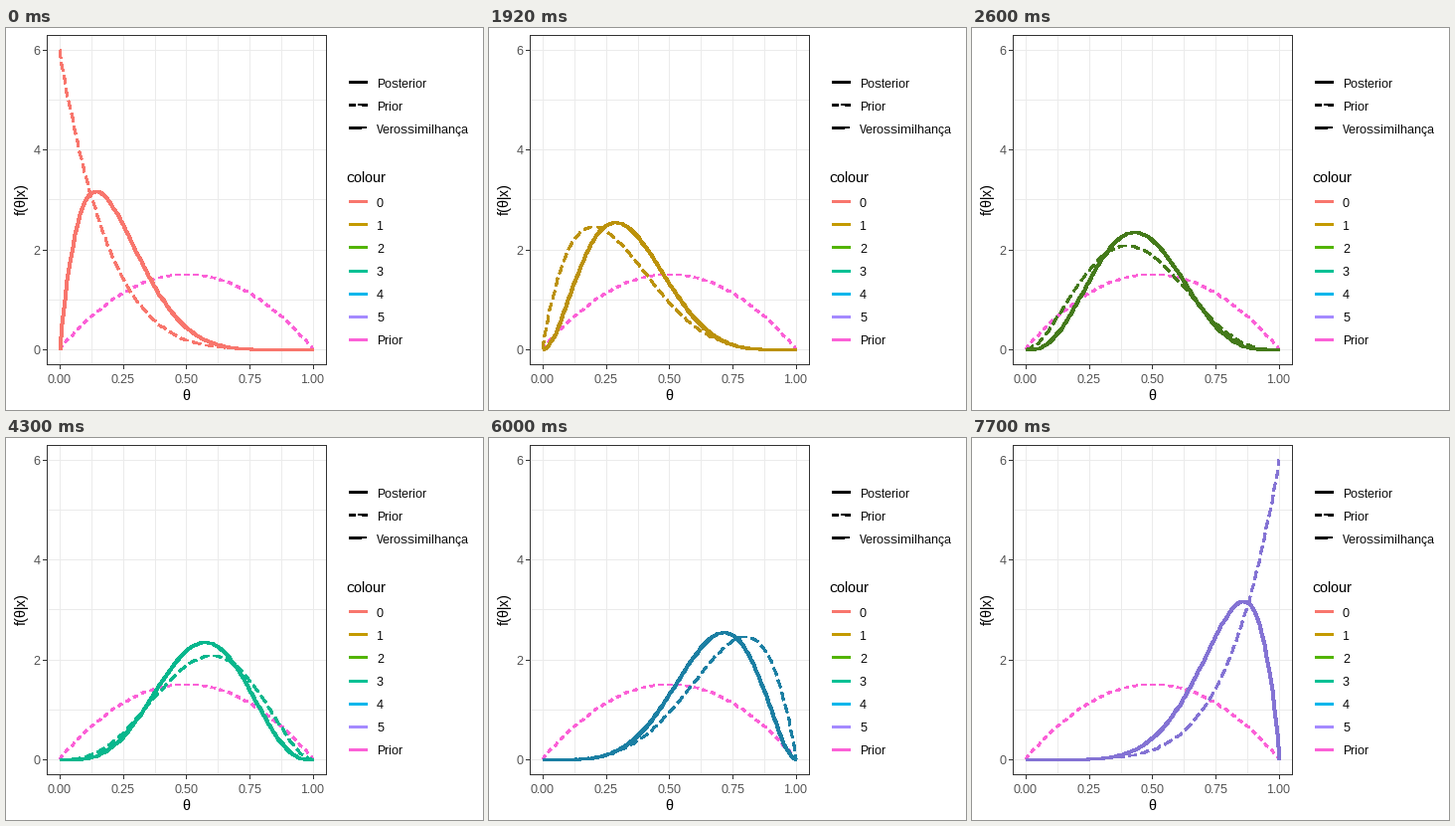
Recreate the animation shown at these times as a matplotlib script. Size 480 by 384 pixels, loop 9300 ms.

```python
from math import gamma

import matplotlib.pyplot as plt
import numpy as np
from matplotlib.animation import FuncAnimation

W, H, DPI = 480, 384, 96
PX = 72 / DPI  # points per pixel
TICK_MS = 100
LOOP_MS = 9300
CHANGES = [900, 2600, 4300, 6000, 7700]
TRIALS = 5

plt.rcParams.update({
    "font.family": ["Liberation Sans", "DejaVu Sans"],
    "text.hinting": "native",
    "text.hinting_factor": 1,
    "text.kerning_factor": 6,
    "path.simplify": False,
})

LEGEND_COLOURS = ["#F8766D", "#C49A00", "#53B400", "#00C094",
                  "#00B6EB", "#A58AFF", "#FB61D7"]
CURVE_COLOURS = ["#F8766D", "#BC920A", "#447A1A", "#07B78D", "#1B7FA3", "#8473D4"]
SOLID, SHORT, LONG = "-", (0, (2, 2)), (0, (4, 2))
THICK, THIN = 3, 2

LEFT, RIGHT, TOP, BOTTOM = 41.5, 322.5, 7.5, 338.5
TICK, KEY_STEP = 3.65, 23.04
SMALL, LARGE = 12, 15
GRID, FRAME, LABEL = "#EBEBEB", "#333333", "#4D4D4D"

fig = plt.figure(figsize=(W / DPI, H / DPI), dpi=DPI, facecolor="white")
ax = fig.add_axes([0, 0, 1, 1])
ax.set(xlim=(0, W), ylim=(H, 0))
ax.axis("off")


def to_x(theta):
    return LEFT + (RIGHT - LEFT) * (theta + 0.05) / 1.1


def to_y(density):
    return BOTTOM - (BOTTOM - TOP) * (density / 6 + 0.05) / 1.1


def on_pixels(values, width):
    """Truncate to whole pixels, centring the pen on the pixel grid."""
    return np.floor(np.asarray(values) - 1e-6) + width % 2 / 2


def line(xs, ys, colour, width=1, style=SOLID, **kw):
    return ax.plot(on_pixels(xs, width), on_pixels(ys, width), color=colour,
                   lw=width * PX, ls=style, antialiased=False, snap=False,
                   solid_capstyle="butt", dash_capstyle="butt", **kw)[0]


def text(x, y, label, size=SMALL, colour="black", **kw):
    ax.text(x, y, label, fontsize=size * PX, color=colour, va="baseline", **kw)


def beta_density(t, a, b):
    return gamma(a + b) / (gamma(a) * gamma(b)) * t ** (a - 1) * (1 - t) ** (b - 1)


def draw_panel():
    for theta in np.linspace(0, 1, 9):
        line([to_x(theta)] * 2, [TOP, BOTTOM], GRID)
    for density in range(7):
        line([LEFT, RIGHT], [to_y(density)] * 2, GRID)
    for theta in np.linspace(0, 1, 5):
        x = to_x(theta)
        line([x, x], [BOTTOM, BOTTOM + TICK], FRAME)
        text(x - 0.5, 357, f"{theta:.2f}", colour=LABEL, ha="center")
    for density in range(0, 7, 2):
        y = to_y(density)
        line([LEFT - TICK, LEFT], [y, y], FRAME)
        text(34.5, y + 4.5, str(density), colour=LABEL, ha="right")
    line([LEFT, RIGHT, RIGHT, LEFT, LEFT], [TOP, TOP, BOTTOM, BOTTOM, TOP],
         FRAME, zorder=6)
    text(to_x(0.5) - 1, 374, "θ", LARGE, ha="center")
    text(20, 171.5, "f(θ|x)", LARGE, ha="center", rotation=90,
         rotation_mode="anchor")


def draw_key(y, label, colour="black", style=SOLID):
    for width in (THIN, THICK):
        line([345.2, 363.6], [y, y], colour, width, style)
    text(373, y + 5, label)


def draw_legends():
    styles = {"Posterior": SOLID, "Prior": SHORT, "Verossimilhança": LONG}
    for i, (label, style) in enumerate(styles.items()):
        draw_key(54.8 + KEY_STEP * i, label, style=style)
    text(342.5, 155, "colour", LARGE)
    for i, colour in enumerate(LEGEND_COLOURS):
        draw_key(174.9 + KEY_STEP * i, str(i) if i <= TRIALS else "Prior", colour)


draw_panel()
draw_legends()

theta = np.linspace(0, 1, 101)
xs = to_x(theta)
line(xs, to_y(beta_density(theta, 2, 2)), LEGEND_COLOURS[-1], THIN, SHORT, zorder=3)
likelihood = line(xs, xs, "black", THIN, LONG, zorder=4)
posterior = line(xs, xs, "black", THICK, zorder=5)


def update(frame):
    successes = sum(frame * TICK_MS >= t for t in CHANGES)
    failures = TRIALS - successes
    for curve, extra, width in ((likelihood, 1, THIN), (posterior, 2, THICK)):
        density = beta_density(theta, successes + extra, failures + extra)
        curve.set_ydata(on_pixels(to_y(density), width))
        curve.set_color(CURVE_COLOURS[successes])
    return likelihood, posterior


anim = FuncAnimation(fig, update, frames=LOOP_MS // TICK_MS, interval=TICK_MS,
                     repeat=True, repeat_delay=0)
plt.show()
```
